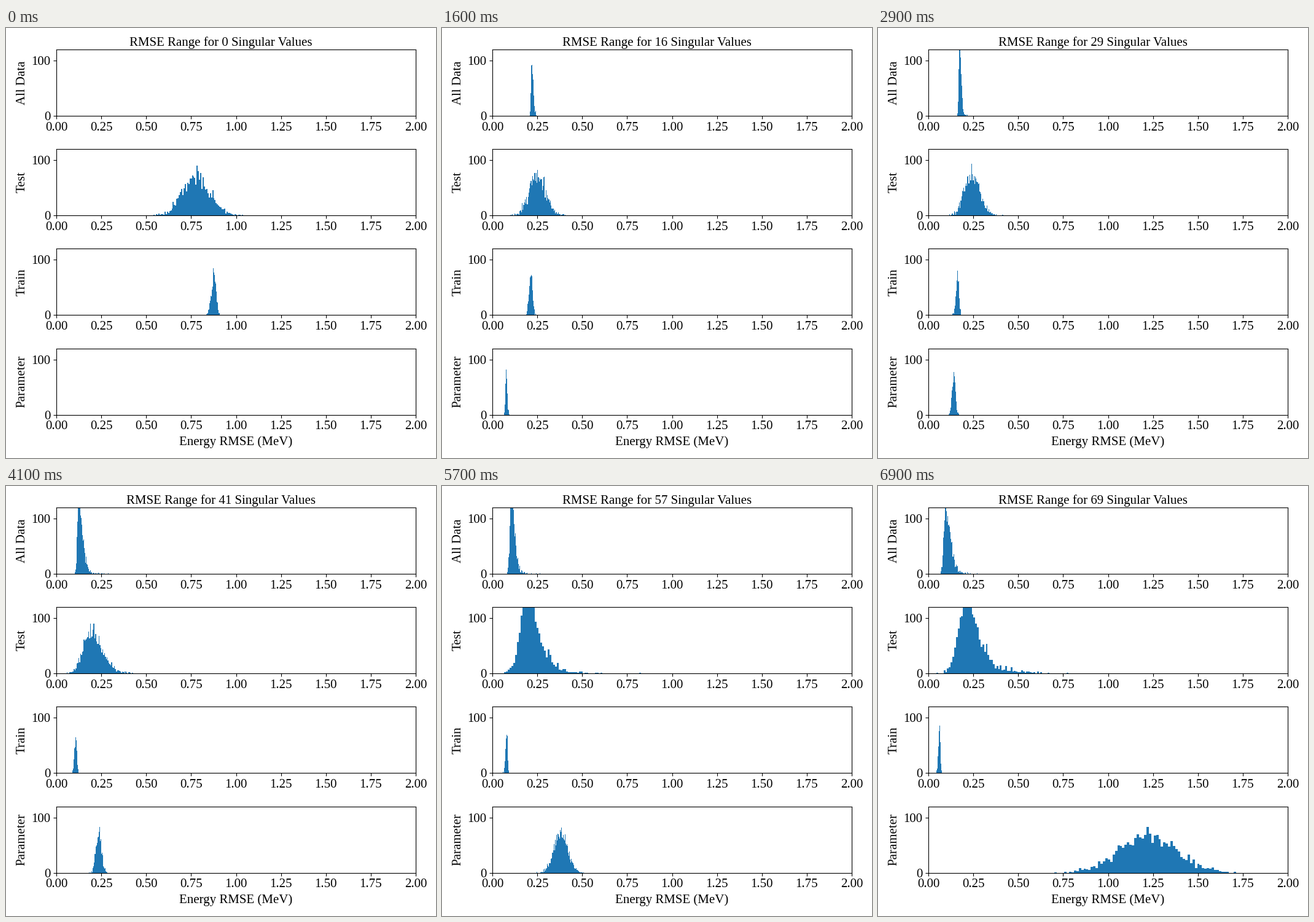
These frames come from a looping animation (700x700 px, 7000 ms). A matplotlib script:

```python
import numpy as np
import matplotlib.pyplot as plt
from matplotlib.animation import FuncAnimation

SIZE, DPI = 700, 100
FRAMES, INTERVAL = 70, 100
BINS, SAMPLES = 75, 2000
BLUE = "#1f77b4"

plt.rcParams["font.family"] = "Liberation Serif"
plt.rcParams["font.size"] = 15


def path(n, *points):
    x, y = zip(*points)
    return np.interp(n, x, y)


def skew(n):
    """How far the right flank spreads, shared by the two upper rows."""
    return path(n, (0, 0.1), (29, 0.2), (41, 0.75), (50, 0.2), (63, 1))


# Each rule gives mode, left spread, right spread and share of long tail.
def all_data(n):
    mode = path(n, (1, 0.55), (5, 0.3), (16, 0.2185), (29, 0.174),
                (41, 0.122), (50, 0.110), (69, 0.095))
    return mode, 0.002 + 0.0001 * n, 0.004 + 0.025 * skew(n), 0.3


def test(n):
    mode = path(n, (0, 0.775), (5, 0.33), (16, 0.248), (29, 0.24),
                (41, 0.185), (69, 0.205))
    settle = 0.035 * np.exp(-n / 6)
    tail = np.clip((n - 41) / 25, 0, 0.75)
    return mode, 0.04 + settle, 0.038 + 0.042 * skew(n) + settle, tail


def train(n):
    mode = path(n, (0, 0.878), (5, 0.29), (16, 0.216), (29, 0.164),
                (41, 0.108), (50, 0.0905), (69, 0.062))
    left = max(0.0065, 0.0145 - 0.00018 * n)
    return mode, left, 0.75 * left, 0


def parameter(n):
    growth = path(n, (1, np.log(0.017)), (8, np.log(0.062)),
                  (16, np.log(0.078)), (29, np.log(0.142)),
                  (41, np.log(0.236)), (50, np.log(0.286)),
                  (63, np.log(0.487)), (69, np.log(1.22)))
    mode = np.exp(growth)
    spread = mode * (0.065 + 0.065 * np.clip((n - 50) / 13, 0, 1))
    return mode, spread, spread, 0


# Label, rule and the first count of singular values that shows bars
ROWS = [("All Data", all_data, 1), ("Test", test, 0),
        ("Train", train, 0), ("Parameter", parameter, 1)]


def histogram(rule, n, rng):
    mode, left, right, tail = rule(n)
    bell = np.abs(rng.normal(size=SAMPLES))
    long = rng.exponential(size=SAMPLES)
    rising = np.where(rng.random(SAMPLES) < tail, long, bell)
    is_left = rng.random(SAMPLES) < left / (left + right)
    values = mode + np.where(is_left, -left * bell, right * rising)
    return np.histogram(values, BINS)


fig = plt.figure(figsize=(SIZE / DPI, SIZE / DPI), dpi=DPI, facecolor="white")
title = fig.suptitle("", fontsize=15, y=0.98)

LEFT, WIDTH, TOP, HEIGHT, PITCH = 82, 585, 34.9, 108, 162.25
EMPTY = np.zeros(BINS), np.linspace(0, 2, BINS + 1)
bars = []
for i, (label, _, _) in enumerate(ROWS):
    bottom = SIZE - (TOP + i * PITCH + HEIGHT)
    ax = fig.add_axes([v / SIZE for v in (LEFT, bottom, WIDTH, HEIGHT)])
    bars.append(ax.stairs(*EMPTY, fill=True, color=BLUE, linewidth=0))
    ax.set(xlim=(0, 2), ylim=(0, 120), yticks=[0, 100],
           xticks=np.arange(0, 2.01, 0.25), ylabel=label)
    ax.xaxis.set_major_formatter("{x:.2f}")
ax.set_xlabel("Energy RMSE (MeV)")


def draw(n):
    title.set_text(f"RMSE Range for {n} Singular Values")
    rng = np.random.default_rng(100 + n)
    for bar, (_, rule, first) in zip(bars, ROWS):
        bar.set_data(*(histogram(rule, n, rng) if n >= first else EMPTY))
    return [title, *bars]


def reset():
    return draw(0)


anim = FuncAnimation(fig, draw, frames=FRAMES, interval=INTERVAL,
                     init_func=reset, repeat=True, repeat_delay=0, blit=False)
plt.show()
```
